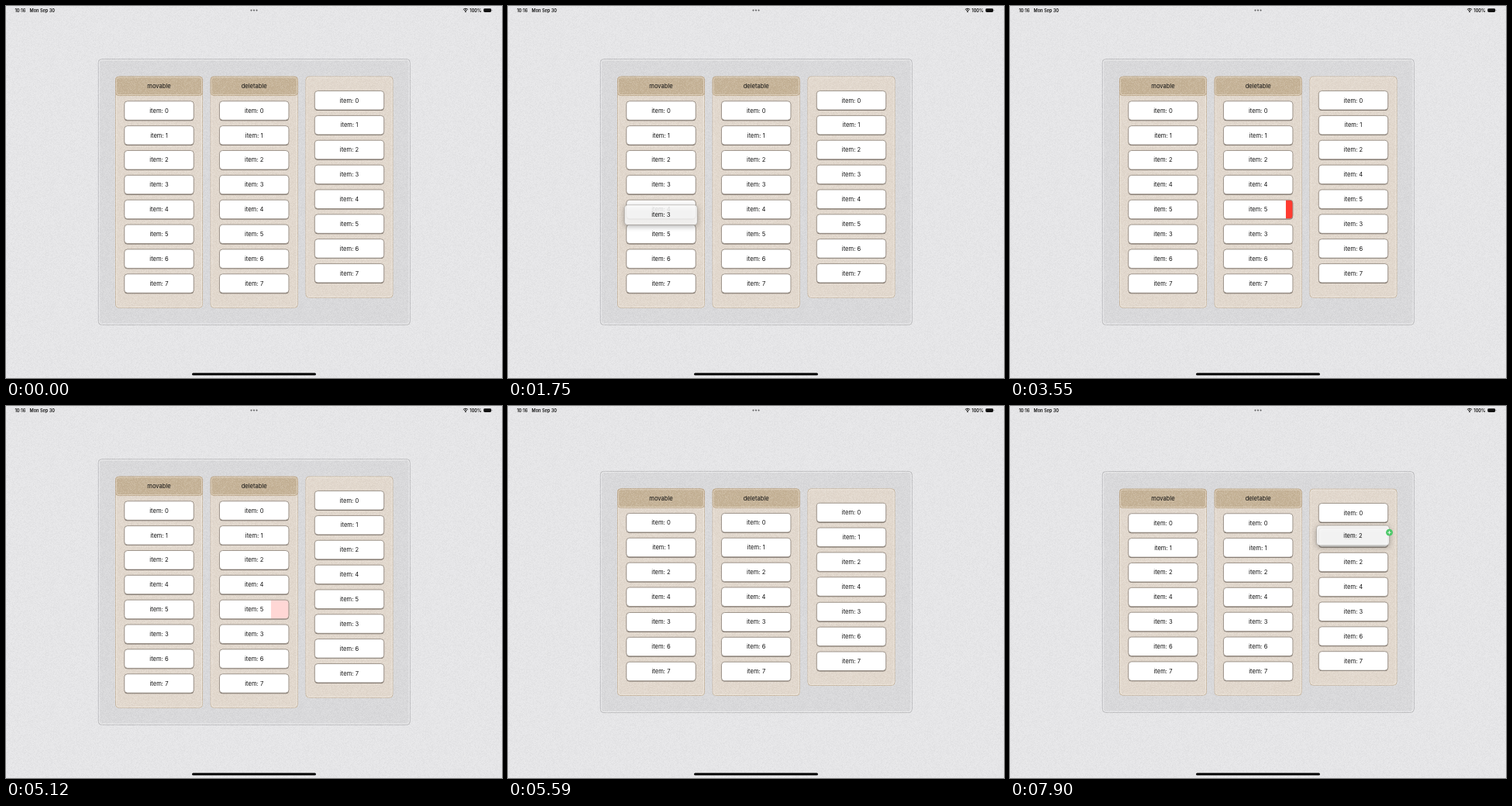
An HTML page with a canvas for the animation above (8000 ms loop, 640x480 px).

```html
<!DOCTYPE html>
<html lang="en">
<head>
<meta charset="utf-8">
<title>Reorderable lists</title>
<style>
  html, body { margin: 0; width: 100%; height: 100%; overflow: hidden; background: #e7e7e9; }
  canvas { display: block; width: 640px; height: 480px; }
</style>
</head>
<body>
<canvas id="stage" width="640" height="480"></canvas>
<script>
const LOOP = 8000;
const PITCH = 31.86;
const ROW = { w: 89.5, h: 24.5 };
const ORDER = [0, 1, 2, 4, 5, 3, 6, 7];
const RED = '255,59,48';
const COLUMNS = [
  { x: 141.5, h: 298, first: 135, title: 'movable' },
  { x: 264.2, h: 298, first: 135, title: 'deletable' },
  { x: 387, h: 285, first: 121.8 }
];

// Moments at which the picture advances: [start, end, count].
const RUNS = [
  [1210, 1950, 8], [2050, 2790, 8], [2900, 3220, 4],
  [3550, 3670, 2], [3810, 3810, 1], [5120, 5810, 7], [7240, 7900, 7]
];

// Lifted rows: path holds [time, centre y, scale].
const DRAGS = [
  { label: 3, x: 197.3, from: 1210, to: 2790, badgeAt: 2050, badgeY: -12.5,
    path: [[1150, 230.6, 1], [1320, 230.6, 1.05], [1430, 233, 1.05], [1740, 269.8, 1.05],
           [1950, 287, 1.05], [2150, 296, 1.05], [2680, 296.8, 1.05], [2790, 294.5, 1]] },
  { label: 2, x: 442.5, from: 7240, to: LOOP, badgeAt: 7850, badgeY: -3.8,
    path: [[7180, 201.5, 1], [7350, 201.5, 1.05], [7460, 201, 1.05], [7570, 195, 1.05],
           [7680, 185, 1.05], [7790, 174, 1.05], [7900, 167, 1.05]] }
];
const SWIPE = [[3530, 0], [3550, 9], [3670, 14], [3810, 23]];

const ctx = document.getElementById('stage').getContext('2d');

function snap(t) {
  let at = 0;
  for (const [start, end, count] of RUNS) {
    if (t < start) break;
    const gap = (end - start) / (count - 1 || 1) || 100;
    at = start + gap * Math.min(count - 1, Math.floor((t - start + 8) / gap));
  }
  return at;
}

function spring(ms) {
  const k = Math.max(0, ms) * 0.01257;
  const v = 1 - (1 + k) * Math.exp(-k);
  return v > 0.995 ? 1 : v;
}

function track(keys, t, i = 1) {
  if (t <= keys[0][0]) return keys[0][i];
  for (let n = 1; n < keys.length; n++) {
    const a = keys[n - 1], b = keys[n];
    if (t <= b[0]) return a[i] + (b[i] - a[i]) * (t - a[0]) / (b[0] - a[0]);
  }
  return keys[keys.length - 1][i];
}

function box(x, y, w, h, r, fill, stroke, line = 1) {
  ctx.beginPath();
  ctx.roundRect(x, y, w, h, r);
  if (fill) { ctx.fillStyle = fill; ctx.fill(); }
  if (stroke) { ctx.strokeStyle = stroke; ctx.lineWidth = line; ctx.stroke(); }
}

function dot(x, y, r, color) {
  ctx.fillStyle = color;
  ctx.beginPath();
  ctx.arc(x, y, r, 0, 7);
  ctx.fill();
}

function label(text, x, y, size = 7.6, weight = 400, align = 'center') {
  ctx.font = `${weight} ${size}px Inter, sans-serif`;
  ctx.textAlign = align;
  ctx.fillStyle = '#111';
  ctx.fillText(text, x, y + size * 0.36);
}

function makeGrain() {
  const tile = document.createElement('canvas');
  tile.width = tile.height = 160;
  const g = tile.getContext('2d');
  let seed = 7;
  for (let y = 0; y < 160; y++) {
    for (let x = 0; x < 160; x++) {
      seed = (seed * 16807) % 2147483647;
      const v = seed / 2147483647 - 0.5;
      g.fillStyle = v < 0 ? `rgba(0,0,0,${-v * 0.05})` : `rgba(255,255,255,${v * 0.3})`;
      g.fillRect(x, y, 1, 1);
    }
  }
  return ctx.createPattern(tile, 'repeat');
}
const grain = makeGrain();

function statusBar() {
  label('10:16', 11.5, 5.5, 5.6, 600, 'left');
  label('Mon Sep 30', 30.5, 5.5, 5.6, 600, 'left');
  label('100%', 598.3, 5.5, 5.6, 600, 'left');
  for (const x of [316.5, 320, 323.5]) dot(x, 5.6, 1.1, '#6b6b6d');
  ctx.strokeStyle = '#111';
  ctx.lineWidth = 1;
  for (const r of [2.6, 4.3]) {
    ctx.beginPath();
    ctx.arc(593, 7.6, r, -Math.PI * 0.76, -Math.PI * 0.24);
    ctx.stroke();
  }
  dot(593, 7.2, 0.9, '#111');
  box(616.3, 3.2, 9.8, 4.8, 1.4, '#111');
  box(626.6, 4.7, 0.8, 1.8, 0.4, '#777');
  box(240, 473.6, 160, 3, 1.5, '#000');
}

function frames(p) {
  const dy = 16 * p, cut = 32 * p;
  box(119.3, 68.7 + dy, 402, 342.6 - cut, 4, '#d9d9db', '#b4b4b6', 0.9);
  box(120.3, 69.7 + dy, 400, 340.6 - cut, 3.5, null, '#f1f1f2', 0.9);
  for (const c of COLUMNS) {
    const y = 91.2 + dy;
    box(c.x, y, 112, c.h - cut, 4, '#e2d8cd', '#c5b298', 0.9);
    box(c.x + 0.9, y + 0.9, 110.2, c.h - 1.8 - cut, 3.5, null, '#f3ece4', 0.8);
    if (!c.title) continue;
    box(c.x, y, 112, 24.3, 4, '#c5b296', '#b9a283', 0.9);
    box(c.x + 0.9, y + 0.9, 110.2, 22.6, 3.5, null, '#e6dac8', 0.8);
  }
}

function row(x, y, n, button) {
  const { w, h } = ROW, left = x - w / 2, top = y - h / 2;
  box(left, top + 0.9, w, h, 4, 'rgba(70,62,56,.7)');
  box(left, top, w, h, 4, '#fff');
  if (button && button.w > 0) {
    ctx.save();
    ctx.clip();
    ctx.fillStyle = `rgba(${RED},${button.alpha})`;
    ctx.fillRect(left + w - button.w, top, button.w, h);
    ctx.restore();
  }
  box(left, top, w, h, 4, null, '#968c82', 0.9);
  label('item: ' + n, x, y);
}

function rows(t, p) {
  const q = spring(t - 2650);
  const slot = n => {
    if (n === 3) return 3 + 2 * q - p;
    if (n === 4) return 4 - q;
    if (n === 5) return 5 - q - p / 2;
    return n > 5 ? n - p : n;
  };
  const button = {
    w: track(SWIPE, t),
    alpha: t < 5120 ? 1 : Math.min(0.5, 0.2 + (t - 5120) * 0.0013)
  };
  const order = t >= 5120 ? [5, ...ORDER.filter(n => n !== 5)] : ORDER;
  COLUMNS.forEach((c, i) => {
    const x = c.x + 56;
    for (const n of order) {
      const alpha = n === 5 ? 1 - p : 1;
      if (alpha < 0.03) continue;
      ctx.globalAlpha = alpha;
      row(x, c.first + slot(n) * PITCH + 16 * p, n, i === 1 && n === 5 ? button : null);
    }
    ctx.globalAlpha = 1;
    if (c.title) label(c.title, x, 103.2 + 16 * p);
  });
}

function preview(d, t) {
  if (t < d.from || t >= d.to) return;
  const y = track(d.path, t), s = track(d.path, t, 2);
  const w = ROW.w * s, h = ROW.h * s;
  ctx.save();
  ctx.shadowColor = 'rgba(0,0,0,.38)';
  ctx.shadowBlur = 7;
  ctx.shadowOffsetY = 2;
  box(d.x - w / 2, y - h / 2, w, h, 4, 'rgba(255,255,255,.84)');
  ctx.restore();
  box(d.x - w / 2, y - h / 2, w, h, 4, null, 'rgba(130,125,120,.5)', 0.8);
  label('item: ' + d.label, d.x, y);
  if (t < d.badgeAt) return;
  const bx = d.x + 47, by = y + d.badgeY;
  dot(bx, by, 4.4, '#4cc868');
  ctx.fillStyle = '#fff';
  ctx.fillRect(bx - 2.2, by - 0.4, 4.4, 0.8);
  ctx.fillRect(bx - 0.4, by - 2.2, 0.8, 4.4);
}

function draw(now) {
  const t = snap(now % LOOP);
  const p = spring(t - 5115);
  ctx.fillStyle = '#e6e6e8';
  ctx.fillRect(0, 0, 640, 480);
  frames(p);
  ctx.fillStyle = grain;
  ctx.fillRect(0, 0, 640, 480);
  rows(t, p);
  for (const d of DRAGS) preview(d, t);
  statusBar();
}

const began = performance.now();
function tick() {
  draw(performance.now() - began);
  requestAnimationFrame(tick);
}
tick();
</script>
</body>
</html>
```
